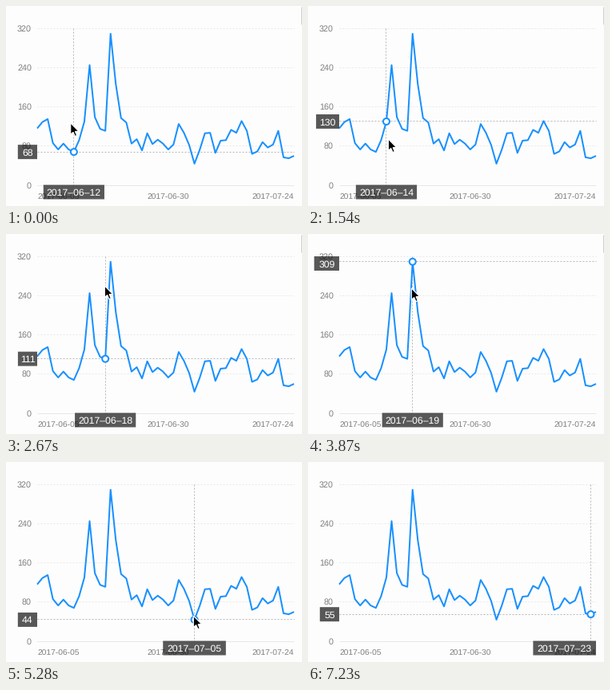
Animation of 370 by 251 pixels, one loop 7530 ms. Source, as a matplotlib script:

```python
import numpy as np
import matplotlib.pyplot as plt
from matplotlib.animation import FuncAnimation
from matplotlib.patches import Circle, Polygon, Rectangle

W, H, DPI = 370, 251, 64
PX = 72 / DPI                     # points per pixel
LOOP, STEP = 7530, 30
LAG = 50                          # tooltip trails the pointer, ms
LEFT, RIGHT, TOP, BASE = 39, 360, 28, 225

BLUE, GRID, MUTED, GUIDE = "#1890ff", "#e8e8e8", "#808080", "#b8b8b8"
plt.rcParams["font.family"] = "Liberation Sans"
plt.rcParams["text.hinting"] = "none"

# Daily series shown by the chart
VALUES = np.array([
    116, 129, 135, 86, 73, 85, 73, 68, 92, 130, 245, 139, 115, 111, 309,
    206, 137, 128, 85, 94, 71, 106, 84, 93, 85, 73, 83, 125, 107, 82,
    44, 72, 106, 107, 66, 91, 92, 113, 107, 131, 111, 64, 69, 88, 77,
    83, 111, 57, 55, 60])
LAST = len(VALUES) - 1
XS = np.linspace(LEFT, RIGHT, LAST + 1)

# Pointer stops: arrival, x, y and an optional rest in ms
STOPS = [(-60, 84, 146), (400, 64, 152), (1100, 112, 160), (1510, 100, 169),
         (2100, 131, 108), (2640, 124, 65, 600), (3510, 130, 68, 380),
         (4620, 222, 160, 230), (5280, 235, 193), (6040, 308, 196),
         (6650, 352, 206, 290), (7220, 374, 256)]
EDGE_TOGGLES = [420, 1200, 1980, 2580, 4260, 5400, 7080]


def y_of(value):
    return BASE - value * (BASE - TOP) / 320


def build_path():
    knots = []
    for t, x, y, *rest in STOPS:
        knots += [(t + r, x, y) for r in (0, *rest)]
    return np.array(knots).T


TIMES, *TRACKS = build_path()


def pointer(t):
    return np.array([np.interp(t, TIMES, track) for track in TRACKS])


def date_of(i, dash="-"):
    month, day = (6, 5 + i) if i <= 25 else (7, i - 25)
    return f"2017{dash}{month:02d}{dash}{day:02d}"


fig = plt.figure(figsize=(W / DPI, H / DPI), dpi=DPI, facecolor="#fdfdfd")
ax = fig.add_axes([0, 0, 1, 1])
ax.set(xlim=(0, W), ylim=(H, 0))
ax.axis("off")


def rule(xs, ys, color, dash=None, z=1):
    """Crisp one-pixel line; whole coordinates name the pixel."""
    line, = ax.plot(xs, ys, color=color, lw=PX, zorder=z,
                    solid_capstyle="butt", dash_capstyle="butt")
    if dash:
        line.set_linestyle((0, dash))
    return line


def label(x, y, text, size, color, ha, z=2):
    """Text whose digits are centred on y."""
    return ax.text(x, y + 0.36 * size, text, fontsize=size * PX, color=color,
                   ha=ha, va="baseline", zorder=z)


class Tag:
    """Dark translucent box with white text."""
    HEIGHT, SIZE, PAD = 18, 12.3, 5

    def __init__(self):
        self.box = Rectangle((0, 0), 1, self.HEIGHT, fc=(0, 0, 0, 0.65),
                             lw=0, zorder=7, snap=False)
        ax.add_patch(self.box)
        self.text = label(0, 0, "", self.SIZE, "white", "center", 8)

    @classmethod
    def width(cls, text):
        return 2 * cls.PAD + sum(4.7 if c == "1" else 7.1 for c in text)

    def place(self, x, y, text):
        self.box.set_xy((x, y))
        self.box.set_width(self.width(text))
        self.text.set_text(text)
        self.text.set_position((x + self.width(text) / 2,
                                y + self.HEIGHT / 2 + 0.36 * self.SIZE))


for tick in range(0, 321, 80):
    y = int(y_of(tick))
    rule([LEFT, RIGHT], [y, y], GRID, (2, 2) if tick else None)
    label(32, y + 0.5, str(tick), 10.8, MUTED, "right")
for i, x, ha in [(0, LEFT, "left"), (25, 203, "center"),
                 (LAST, RIGHT, "right")]:
    label(x, 239.3, date_of(i), 10.3, MUTED, ha)

ax.plot(XS, y_of(VALUES), color=BLUE, lw=2 * PX, zorder=4,
        solid_joinstyle="round", solid_capstyle="butt")
v_guide = rule([0, 0], [TOP, BASE], GUIDE, (2, 2), 3)
h_guide = rule([LEFT, RIGHT], [0, 0], GUIDE, (2, 2), 3)
dot = Circle((0, 0), 4, fc="white", ec=BLUE, lw=2 * PX, zorder=6)
ax.add_patch(dot)
value_tag, date_tag = Tag(), Tag()
edge = rule([W - 1, W - 1], [1, 23], "#cfcfcf")

ARROW = np.array([(0, 0), (0, 14.6), (3.3, 11.6), (5.6, 16.7), (8, 15.7),
                  (5.8, 10.7), (10.3, 10.5)]) - (0.7, 0)
arrow = Polygon(ARROW, fc="black", ec="white", lw=1.2 * PX, zorder=10,
                joinstyle="miter")
ax.add_patch(arrow)


def draw(frame):
    t = frame * STEP
    near = (pointer(t - LAG)[0] - LEFT) * LAST / (RIGHT - LEFT)
    i = int(np.clip(round(near), 0, LAST - 1))
    x, y = XS[i], y_of(VALUES[i])

    v_guide.set_xdata([int(x)] * 2)
    h_guide.set_ydata([int(y)] * 2)
    dot.center = x, y

    value, date = str(VALUES[i]), date_of(i, "–")
    value_tag.place(LEFT - Tag.width(value), max(TOP, y - Tag.HEIGHT / 2),
                    value)
    w = Tag.width(date)
    date_tag.place(np.clip(x - w / 2, LEFT, RIGHT - w), BASE - 0.5, date)

    arrow.set_xy(ARROW + pointer(t))
    edge.set_visible(np.searchsorted(EDGE_TOGGLES, t) % 2 == 0)
    return v_guide, h_guide, dot, arrow, edge


anim = FuncAnimation(fig, draw, frames=LOOP // STEP, interval=STEP,
                     repeat=True, repeat_delay=0, blit=False)
plt.show()
```
